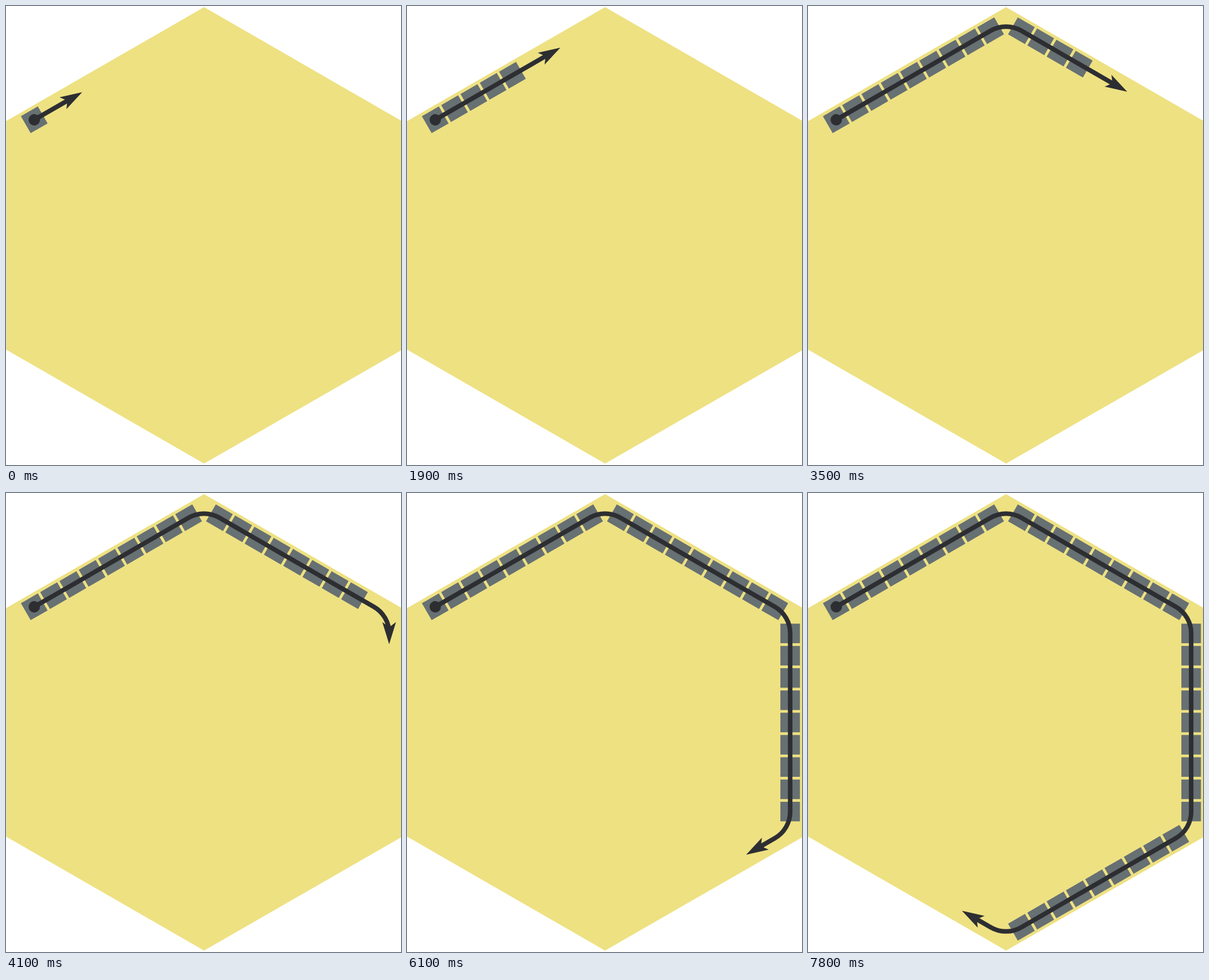
An HTML page that plays this animation: 694x807 px, repeating every 8000 ms.

```html
<!DOCTYPE html>
<html lang="en">
<head>
<meta charset="utf-8">
<title>Squares along a hexagon</title>
<style>
  html, body { margin: 0; width: 100%; height: 100%; overflow: hidden; background: #fff; }
  svg { display: block; width: 694px; height: 807px; }
  .hexagon { fill: #eee182; }
  .edge { fill: #dcdcd6; }
  .square { fill: #677072; }
  .shaft { fill: none; stroke: #2d2e32; stroke-width: 8; }
  .ink { fill: #2d2e32; }
</style>
</head>
<body>
<svg viewBox="0 0 694 807">
  <path class="hexagon" d="M348 2 695 202V605L348 804.5 0 604V202.5Z"/>
  <rect class="edge" y="203" width="0.8" height="401"/>
  <g id="squares"></g>
  <path id="shaft" class="shaft"/>
  <circle id="dot" class="ink" r="10"/>
  <path id="head" class="ink" d="M19 0-20 -12-11 0-20 12Z"/>
</svg>
<script>
const LOOP = 8000;
const CX = 347.9, CY = 403.5;
const PER_SIDE = 9, PITCH = 39.15, SIZE = 34.4;
const APOTHEM = 325.3, BEND = 53.5;

// Moments, in tenths of a second, at which one more square is laid.
const TICKS = [
  14, 16, 17, 19, 21, 24, 26, 28, 29, 31, 33, 35,
  38, 38, 40, 41, 43, 45, 48, 50, 51, 53, 55,
  58, 60, 61, 64, 64, 65, 68, 70, 71, 74, 76, 78
];

const byId = id => document.getElementById(id);

// Place and heading of the i-th square, counted clockwise.
function spot(i) {
  const side = Math.floor(i / PER_SIDE);
  const k = i % PER_SIDE;
  const turn = (side - 2) * 60;
  const a = turn * Math.PI / 180;
  const y = (k - (PER_SIDE - 1) / 2) * PITCH;
  return {
    x: CX + APOTHEM * Math.cos(a) - y * Math.sin(a),
    y: CY + APOTHEM * Math.sin(a) + y * Math.cos(a),
    angle: turn + 90,
    corner: k === 0 && side > 0
  };
}

const place = p => `translate(${p.x} ${p.y}) rotate(${p.angle})`;

const squares = Array.from({ length: TICKS.length + 1 }, (_, i) => {
  const r = document.createElementNS('http://www.w3.org/2000/svg', 'rect');
  r.setAttribute('class', 'square');
  r.setAttribute('x', -SIZE / 2);
  r.setAttribute('y', -SIZE / 2);
  r.setAttribute('width', SIZE);
  r.setAttribute('height', SIZE);
  r.setAttribute('transform', place(spot(i)));
  byId('squares').append(r);
  return r;
});

byId('dot').setAttribute('transform', place(spot(0)));

// The arrow reaches two squares beyond the last one laid.
function show(count) {
  squares.forEach((r, i) => r.setAttribute('visibility', i < count ? 'visible' : 'hidden'));
  const last = count + 1;
  let d = '';
  for (let i = 0; i <= last; i++) {
    const p = spot(i);
    const cmd = i === 0 ? 'M' : p.corner ? `A${BEND} ${BEND} 0 0 1 ` : 'L';
    d += `${cmd}${p.x} ${p.y}`;
  }
  byId('shaft').setAttribute('d', d);
  byId('head').setAttribute('transform', place(spot(last)));
}

let shown = 0;
const start = performance.now();

function frame() {
  const t = (performance.now() - start) % LOOP;
  const count = 1 + TICKS.filter(s => s * 100 <= t).length;
  if (count !== shown) show(shown = count);
  requestAnimationFrame(frame);
}
frame();
</script>
</body>
</html>
```
